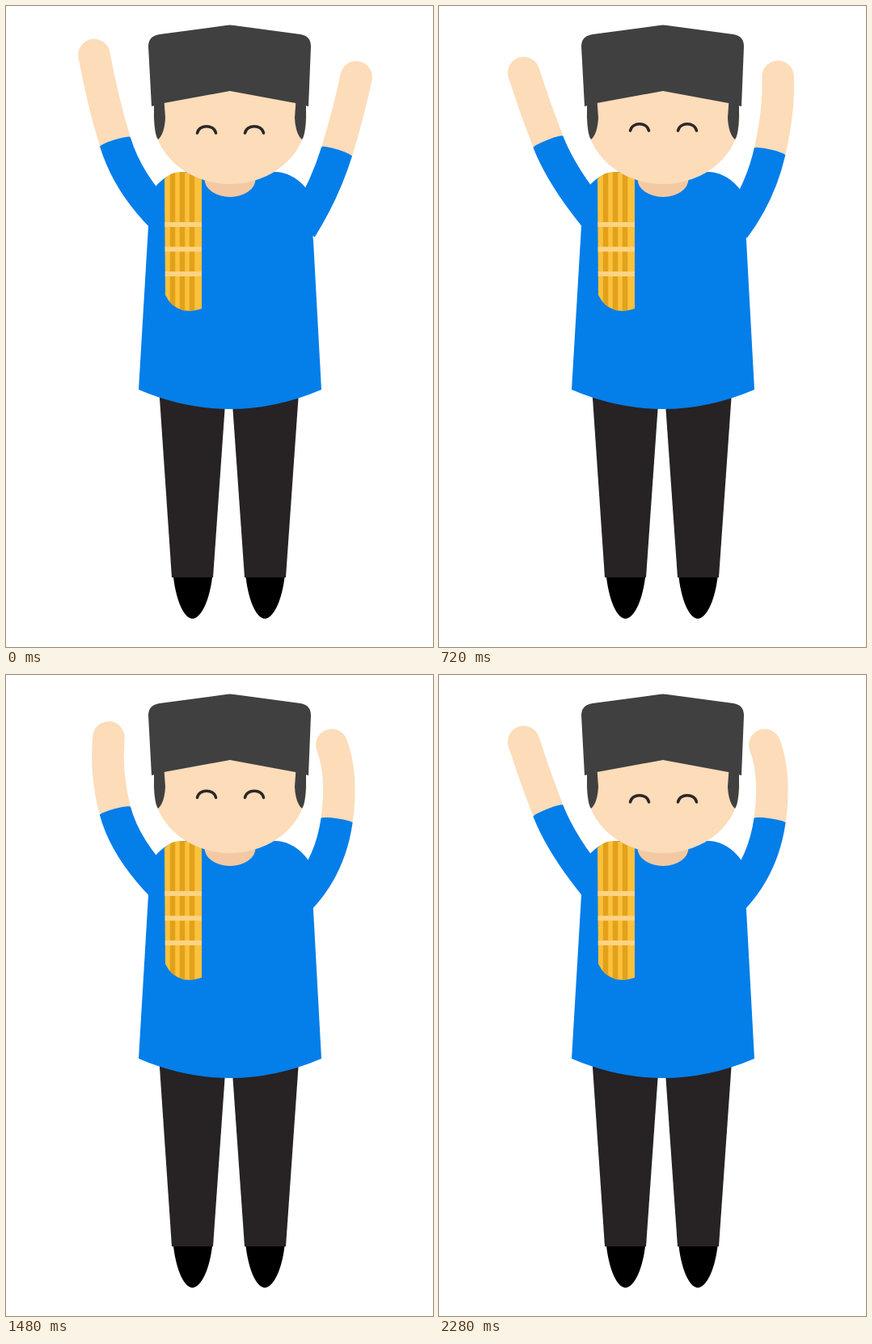
Recreate the animation shown at these times as an HTML page. Size 528x792 px, loop 2.32 s.

```html
<!DOCTYPE html>
<html lang="en">
<head>
<meta charset="utf-8">
<title>Waving man</title>
<style>
  html, body { margin: 0; width: 100%; height: 100%; overflow: hidden; background: #fff; }
  svg { display: block; width: 100vw; height: 100vh; }
  .skin { fill: #fcdcb9; }
  .shirt { fill: #047ee9; }
  .hair { fill: #404040; }
  .arm path { fill: none; stroke-width: 39.5; }
  .arm .fore { stroke: #fcdcb9; stroke-linecap: round; }
  .arm .sleeve { stroke: #047ee9; marker-start: url(#cuff); }
  .eyes { fill: none; stroke: #2b2728; stroke-width: 3.5; stroke-linecap: round; }
</style>
</head>
<body>
<svg viewBox="0 0 528 792">
  <defs>
    <clipPath id="scarf">
      <path d="M196 214 Q203 205 218 205 L242 208 V374 Q230 378 219 376 Q204 372 197 357 Z"/>
    </clipPath>
    <marker id="cuff" orient="auto" markerWidth="1" markerHeight="1" overflow="visible">
      <ellipse class="shirt" rx=".07" ry=".5"/>
    </marker>
  </defs>

  <g fill="#272223">
    <path d="M189 470 L205 706 H256 L272.500 470 Z"/>
    <path d="M278.500 470 L295 706 H346 L362.500 470 Z"/>
  </g>
  <path id="shoe" d="M207 706 C211 738 221 757 230.500 757 C240 757 251 738 255 706 Z"/>
  <use href="#shoe" x="89.500"/>

  <g id="left" class="arm"><path class="fore"/><path class="sleeve"/></g>
  <g id="right" class="arm"><path class="fore"/><path class="sleeve"/></g>

  <path class="shirt" d="M176 272 L185 223 Q200 205 222 205 H335 Q358 207 374 229 L380 290 L390 474 Q277 522 164 474 Z"/>

  <g clip-path="url(#scarf)">
    <path fill="#fcc13a" d="M190 200 h60 v185 h-60 Z"/>
    <path stroke="#e1a11b" stroke-width="6.500" d="M206 200 V385 M218 200 V385 M230 200 V385"/>
    <path stroke="#fdd384" stroke-width="6" d="M190 270 H250 M190 300.500 H250 M190 331 H250"/>
  </g>

  <ellipse cx="277" cy="214" rx="31.500" ry="22" fill="#f3c9a4"/>
  <ellipse class="skin" cx="277" cy="138" rx="94.500" ry="82"/>
  <g class="hair">
    <path id="lock" d="M183 110 L183 138 Q184 160 188 165 Q196 158 197 138 L195 110 Z"/>
    <use href="#lock" transform="matrix(-1 0 0 1 554 0)"/>
    <path d="M180 124 L176 50 Q176 37 190 35 L272 24 Q277 23 282 24 L364 35 Q377 37 377 50 L374 124 L358 120 L277 105 L195 120 Z"/>
  </g>
  <path id="eyes" class="eyes" d="M236.500 157 c2 -11 21 -11 23 0 m36 0 c2 -11 21 -11 23 0"/>
</svg>

<script>
const LOOP = 2320, STEP = 40;

// Times at which both arms turn round; they begin outward and alternate
const turns = [320, 600, 880, 1160, 1560, 1840, 2120];

const left = {
  node: document.getElementById("left"),
  turns: [-320, ...turns, 2400],
  shoulder: [193, 261], cuff: [135, 168],
  bow: [[114, 131], [125, 120]],   // out, in
  hand: [[79, 89], [139, 74]]
};
const right = {
  node: document.getElementById("right"),
  turns: [-40, ...turns, 2920],
  shoulder: [365, 275], cuff: [409, 180],
  bow: [[425, 133], [415, 122]],
  hand: [[438, 88], [394, 86]]
};

const ramp = (t, from, to) => Math.min(1, Math.max(0, (t - from) / (to - from)));
const mix = ([a, b], k) => a.map((v, i) => v + (b[i] - v) * k);

// 0 = arm out, 1 = arm in
function bend(times, t) {
  const i = times.findIndex(x => x > t);
  const k = ramp(t, times[i - 1], times[i]);
  return i % 2 ? k : 1 - k;
}

function drawArm(arm, t, lift) {
  const k = bend(arm.turns, t);
  const hand = mix(arm.hand, k), bow = mix(arm.bow, k);
  hand[1] -= 21 * lift;
  bow[1] -= 8 * lift;
  // The sleeve mirrors the bow through the cuff, so the two curves join smoothly
  const elbow = arm.cuff.map((v, i) => 2 * v - bow[i]);
  const [fore, sleeve] = arm.node.children;
  fore.setAttribute("d", `M${arm.cuff} Q${bow} ${hand}`);
  sleeve.setAttribute("d", `M${arm.cuff} Q${elbow} ${arm.shoulder}`);
}

const eyes = document.getElementById("eyes");

function draw(t) {
  drawArm(left, t, 1 - ramp(t, 0, 320));
  drawArm(right, t, 0);
  const rise = 5.5 * Math.min(ramp(t, 400, 1000), 1 - ramp(t, 1840, 2280));
  eyes.setAttribute("transform", `translate(0 ${-rise})`);
}

const begin = performance.now();
function tick() {
  const t = (performance.now() - begin) % LOOP;
  draw(Math.floor(t / STEP) * STEP);
  requestAnimationFrame(tick);
}
tick();
</script>
</body>
</html>
```
